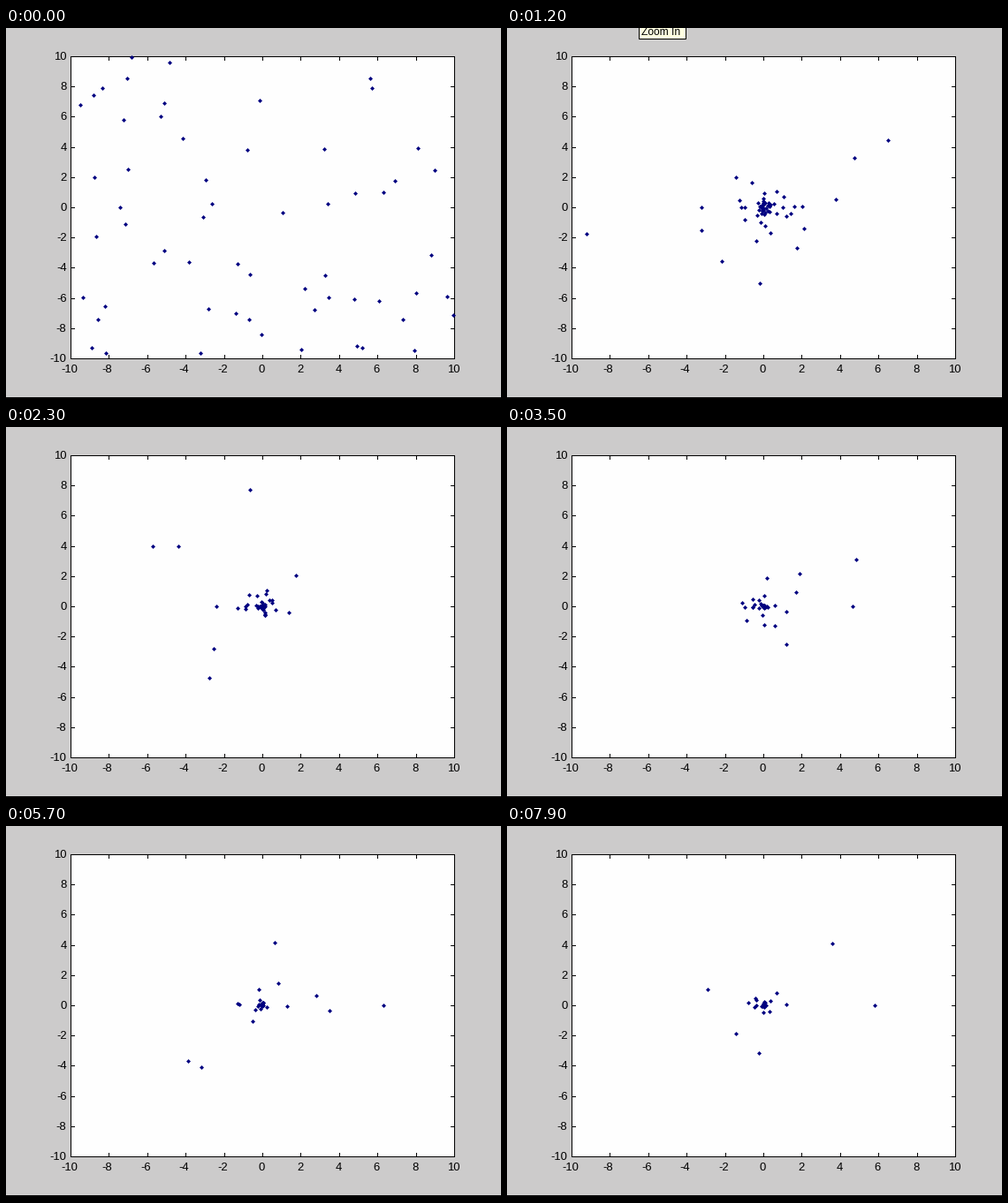
These frames come from a looping animation (560 by 420 pixels, 8000 ms). A matplotlib script:

```python
import numpy as np
import matplotlib.pyplot as plt
from matplotlib.animation import FuncAnimation
from matplotlib.patches import Rectangle

W, H, DPI = 560, 420, 100
PX = 72 / DPI
LEFT, RIGHT, TOP, BOTTOM = 72.5, 506.5, 31.5, 373.5
LIMIT = 10
FRAMES, INTERVAL = 80, 100
COUNT = 60

rng = np.random.default_rng(11)
start = rng.uniform(-LIMIT, LIMIT, (COUNT, 2))
swing = rng.uniform(0.7, 1.4, (COUNT, 2))
rank = np.arange(COUNT)[:, None]


def to_stage(x, y):
    """Axis units to the nearest pixel centre of the stage."""
    px = (LEFT + RIGHT) / 2 + x * (RIGHT - LEFT) / (2 * LIMIT)
    py = (TOP + BOTTOM) / 2 - y * (BOTTOM - TOP) / (2 * LIMIT)
    return np.floor(px) + 0.5, np.floor(py) + 0.5


def swarm_step(frame):
    """Iterations done by a frame; the picture rests on every fifth one."""
    rests = sum(1 for f in range(6, frame + 1, 5) if f != 41)
    return frame - rests


def swarm(step):
    """Particles swing about the origin; higher ranks settle sooner."""
    if step == 0:
        return start
    settle = 0.235 * (1 - np.exp(-step / 30))
    jitter = np.random.default_rng(step).normal(0.15, 0.35, (COUNT, 2))
    return start * np.cos(swing * step) * np.exp(jitter - rank * settle)


fig = plt.figure(figsize=(W / DPI, H / DPI), dpi=DPI, facecolor="#cccbcb")
ax = fig.add_axes([0, 0, 1, 1])
ax.set(xlim=(0, W), ylim=(H, 0))
ax.axis("off")


def line(xs, ys, width=1):
    ax.plot(xs, ys, color="black", lw=width * PX,
            solid_capstyle="projecting", zorder=2)


def label(x, y, text, size=13, ha="center"):
    return ax.text(x, y, text, family="Liberation Sans", fontsize=size * PX,
                   ha=ha, va="baseline", color="black", zorder=5)


ax.add_patch(Rectangle((LEFT, TOP), RIGHT - LEFT, BOTTOM - TOP,
                       fc="#fefefe", ec="none", zorder=1))
line([LEFT, RIGHT, RIGHT, LEFT, LEFT], [TOP, TOP, BOTTOM, BOTTOM, TOP])
line([0, W], [H - 1, H - 1], width=2)
for value in range(-LIMIT, LIMIT + 1, 2):
    x, y = to_stage(value, value)
    for edge, inward in ((TOP, 4), (BOTTOM, -4)):
        line([x, x], [edge, edge + inward])
    for edge, inward in ((LEFT, 4), (RIGHT, -4)):
        line([edge, edge + inward], [y, y])
    label(x - (1 if value < 0 else 0), 390, str(value))
    label(68.5, y + 4.5, str(value), ha="right")

dots, = ax.plot([], [], ls="none", marker="D", ms=3.5 * PX, mew=0,
                color="#000080", zorder=4)
tip_box = ax.add_patch(Rectangle((148.5, -6.5), 53, 18, fc="#ffffe1",
                                 ec="black", lw=PX, zorder=3))
tip_text = label(152, 8, "Zoom In", size=12, ha="left")


def update(frame):
    points = swarm(swarm_step(frame))
    inside = (np.abs(points) <= LIMIT).all(axis=1)
    dots.set_data(*to_stage(*points[inside].T))
    for part in (tip_box, tip_text):
        part.set_visible(3 <= frame < 14)
    return dots, tip_box, tip_text


anim = FuncAnimation(fig, update, frames=FRAMES, interval=INTERVAL,
                     repeat=True, repeat_delay=0)
plt.show()
```
